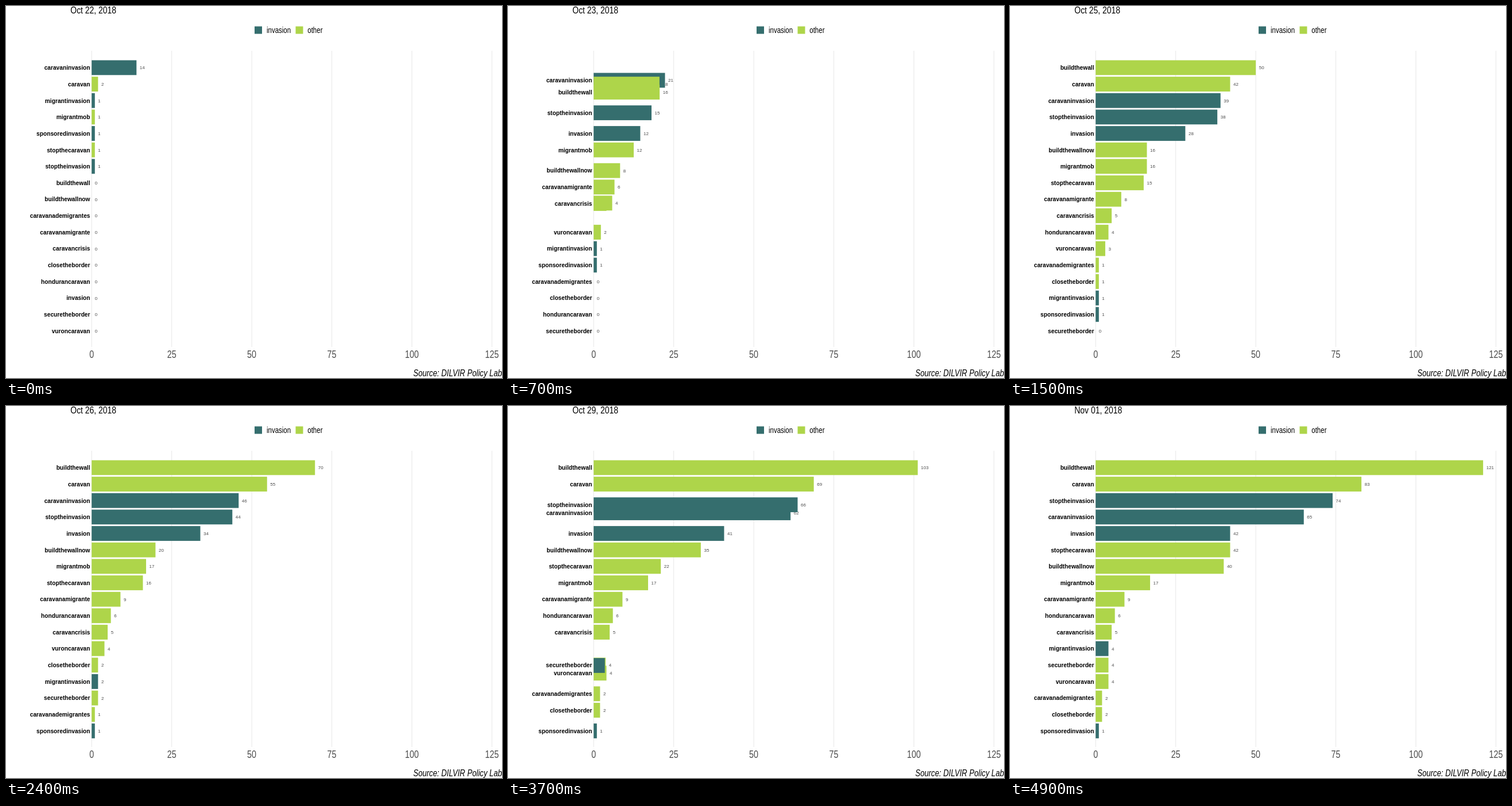
An HTML page with a canvas for the animation above (10000 ms loop, 864x648 px).

```html
<!DOCTYPE html>
<html lang="en">
<head>
<meta charset="utf-8">
<title>Hashtag counts by day</title>
<style>
  html, body { margin: 0; width: 100%; height: 100%; overflow: hidden; background: #fff; }
  canvas { display: block; }
</style>
</head>
<body>
<canvas id="chart" width="864" height="648"></canvas>
<script>
const ctx = document.getElementById('chart').getContext('2d');
const LOOP = 10000, STEP = 100, LAST = 49, DAYS = 10;
const X0 = 149.2, UNIT = 5.578, ROW0 = 107.4, ROW = 28.66, BAR = 25.8;
const TEAL = '#356e6e', GREEN = '#aed54a', GREY = '#4d4d4d';
const FACE = '"Liberation Sans", Arial, sans-serif';

// Daily counts; the last number holds for the remaining days.
const counts = {
  buildthewall: [0, 16, 34, 50, 62, 70, 83, 96, 103, 109, 121],
  buildthewallnow: [0, 8, 9, 16, 18, 20, 25, 29, 35, 38, 40],
  caravan: [2, 18, 28, 42, 48, 55, 62, 68, 69, 76, 83],
  caravanademigrantes: [0, 0, 0, 1, 1, 1, 1, 2],
  caravanamigrante: [0, 6, 8, 8, 9],
  caravancrisis: [0, 4, 4, 5],
  caravaninvasion: [14, 21, 26, 39, 43, 46, 53, 60, 62, 64, 65],
  closetheborder: [0, 0, 0, 1, 2],
  hondurancaravan: [0, 0, 0, 4, 6],
  invasion: [0, 12, 22, 28, 32, 34, 37, 40, 41, 42],
  migrantinvasion: [1, 1, 1, 1, 2, 2, 2, 2, 4],
  migrantmob: [1, 12, 14, 16, 17],
  securetheborder: [0, 0, 0, 0, 2, 2, 3, 3, 4],
  sponsoredinvasion: [1],
  stopthecaravan: [1, 4, 11, 15, 16, 16, 17, 18, 22, 31, 42],
  stoptheinvasion: [1, 15, 27, 38, 42, 44, 51, 57, 66, 70, 74],
  vuroncaravan: [0, 2, 3, 3, 4]
};
const tags = Object.keys(counts);
const countOn = (tag, day) => counts[tag][Math.min(day, counts[tag].length - 1)];

// Tags are listed alphabetically, so the stable sort settles ties by name.
const ranking = Array.from({ length: DAYS + 1 }, (_, day) =>
  [...tags].sort((a, b) => countOn(b, day) - countOn(a, day)));

const keyStep = day => Math.round(day * LAST / DAYS);
const ease = p => p < 0.5 ? 4 * p ** 3 : 1 - 4 * (1 - p) ** 3;
const mix = (a, b, p) => a + (b - a) * p;

function text(str, x, y, font, color, align = 'left', narrow = 1) {
  ctx.save();
  ctx.translate(x, y);
  ctx.scale(narrow, 1);
  ctx.font = `${font} ${FACE}`;
  ctx.fillStyle = color;
  ctx.textAlign = align;
  ctx.fillText(str, 0, 0);
  ctx.restore();
}
const narrowText = (str, x, y, font, color, align) => text(str, x, y, font, color, align, 0.82);

function rect(x, y, w, h, color) {
  ctx.fillStyle = color;
  ctx.fillRect(x, y, w, h);
}

function dateLabel(step) {
  const day = 22 + Math.floor(step * DAYS / LAST);
  return day > 31 ? `Nov 0${day - 31}, 2018` : `Oct ${day}, 2018`;
}

function rowsAt(step) {
  let day = 0;
  while (day < DAYS - 1 && step >= keyStep(day + 1)) day++;
  const start = keyStep(day);
  const p = ease((step - start) / (keyStep(day + 1) - start));
  return ranking[day].map((tag, rank) => {
    const from = countOn(tag, day), to = countOn(tag, day + 1);
    return {
      tag,
      y: ROW0 + ROW * mix(rank, ranking[day + 1].indexOf(tag), p),
      end: X0 + UNIT * mix(from, to, p),
      label: String(p < 0.5 ? from : to)
    };
  });
}

function drawFrame() {
  for (let i = 0; i <= 5; i++) {
    const x = X0 + UNIT * 25 * i;
    rect(x - 0.5, 78, 1.05, 516, '#e8e8e8');
    narrowText(i * 25, x, 613, '17.5px', GREY, 'center');
  }
  rect(433, 35.5, 13, 13, TEAL);
  narrowText('invasion', 454, 47, '14px', '#000');
  rect(504.5, 35.5, 13, 13, GREEN);
  narrowText('other', 525.3, 47, '14px', '#000');
  narrowText('Source: DILVIR Policy Lab', 864, 645, 'italic 16px', '#000', 'right');
}

function draw(step) {
  rect(0, 0, 864, 648, '#fff');
  drawFrame();
  narrowText(dateLabel(step), 112.3, 13, '17px', '#000');
  const rows = rowsAt(step);
  // A label that would collide with an earlier one is left out.
  rows.forEach((row, i) => {
    const near = rows.slice(0, i).filter(r => Math.abs(r.y - row.y) < 7);
    if (!near.length) text(row.tag, 146.5, row.y + 3.8, 'bold 10.2px', '#000', 'right');
    if (!near.some(r => Math.abs(r.end - row.end) < 4.5 * row.label.length))
      text(row.label, row.end + UNIT, row.y + 2.9, '8px', GREY);
  });
  for (const { tag, y, end } of rows)
    rect(X0, y - BAR / 2, end - X0, BAR, tag.endsWith('invasion') ? TEAL : GREEN);
}

const begin = performance.now();
function tick() {
  const t = (performance.now() - begin) % LOOP;
  draw(Math.min(LAST, Math.floor(t / STEP)));
  requestAnimationFrame(tick);
}
tick();
</script>
</body>
</html>
```
